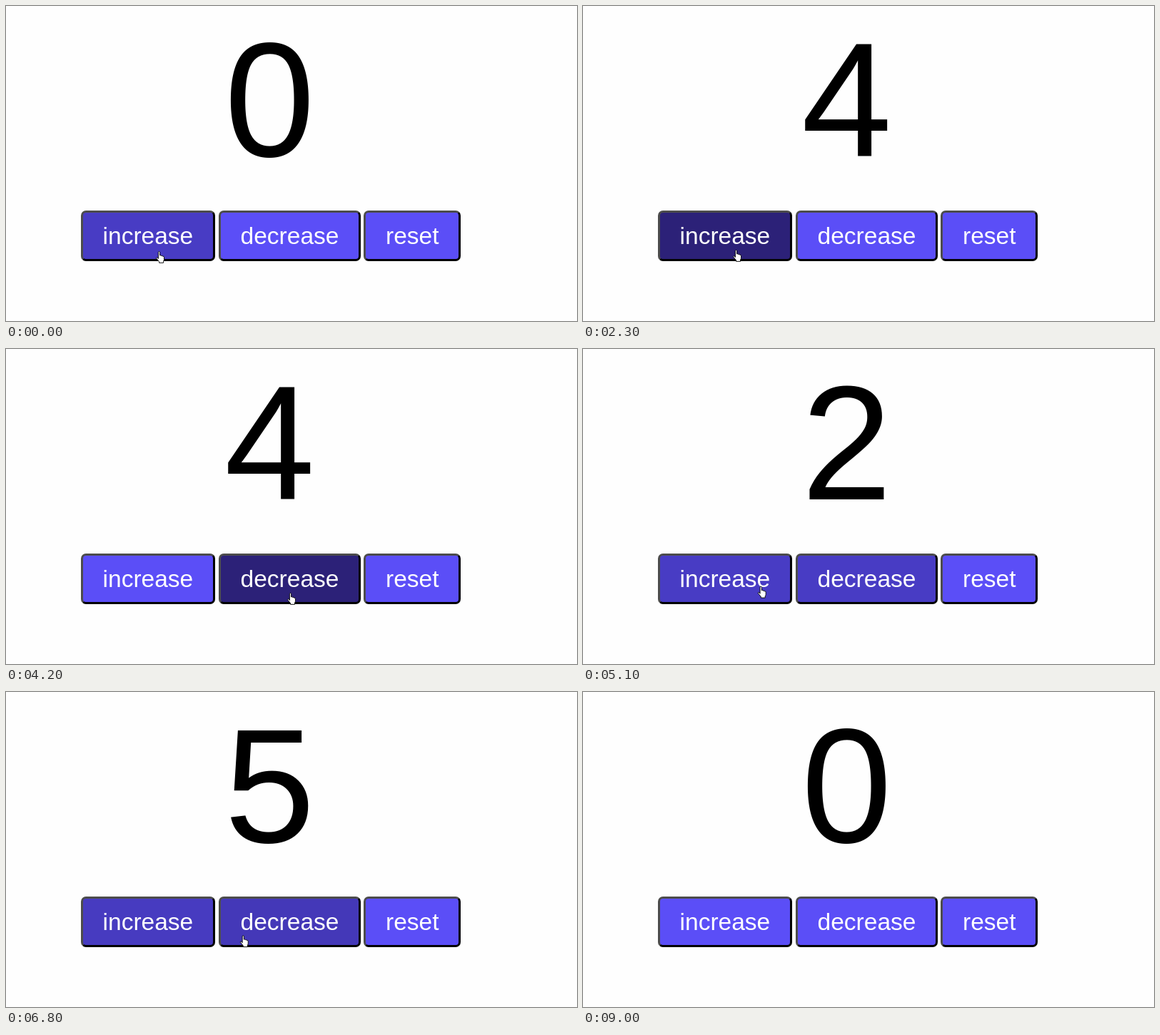
An HTML page for the animation above (9.1 s loop, 800 by 442 pixels).

```html
<!DOCTYPE html>
<html lang="en">
<head>
<meta charset="utf-8">
<title>Counter</title>
<style>
  html, body { margin: 0; width: 100%; height: 100%; overflow: hidden; background: #fefefe; }
  body { position: relative; font-family: "Liberation Sans", Arial, sans-serif; }
  svg { position: absolute; left: 0; top: 0; }
  .btn {
    position: absolute; top: 287px; height: 71px; box-sizing: border-box;
    border: 3px solid; border-color: #4c4c4c #000 #000 #4c4c4c; border-radius: 7px;
    padding: 0 27.6px; font-size: 33.5px; line-height: 65px; color: #fff; white-space: nowrap;
  }
  #increase { left: 105px; }
  #decrease { left: 298px; }
  #reset { left: 501.4px; }
  #count { font-size: 228px; text-anchor: middle; }
</style>
</head>
<body>
<svg width="800" height="442">
  <text id="count" x="369.5" y="211">0</text>
  <path id="one" d="M391.5 51H379C372 66 352 83 333.5 91V110C348 104 363 95 372 87V211H391.5Z"/>
</svg>
<div class="btn" id="increase">increase</div>
<div class="btn" id="decrease">decrease</div>
<div class="btn" id="reset">reset</div>
<svg width="800" height="442">
  <path id="hand" fill="#fff" stroke="#000" stroke-width=".9" stroke-linejoin="round"
    d="M3.4 10.5V1.8Q3.4.5 4.5.5T5.6 1.8V6Q7.3 5 7.7 6.6Q9.3 5.7 9.7 7.3Q11.5 6.7 11.5 8.6V11.5Q11.5 13 10.5 14.2V16.4H4.6V14.8L.9 10.3Q.2 9.2 1.2 8.7Q2.2 8.5 3.4 10.5Z"/>
</svg>
<script>
const LOOP = 9100, STEP = 100, FADE = 250, GONE = 8700;
const BASE = [91, 78, 247], HOVER = [44, 33, 120];
const $ = id => document.getElementById(id);
const clamp = u => Math.min(1, Math.max(0, u));

const actions = { increase: n => n + 1, decrease: n => n - 1, reset: () => 0 };

// each stay over a button, with a regular run of clicks
const visits = [
  { id: "increase", enter: -57, leave: 3408, first: 900, every: 350, clicks: 4 },
  { id: "decrease", enter: 3418, leave: 5008, first: 4300, every: 400, clicks: 2 },
  { id: "increase", enter: 5043, leave: 6714, first: 5500, every: 400, clicks: 3 },
  { id: "decrease", enter: 6727, leave: 7330, first: 7100, every: 400, clicks: 1 },
  { id: "reset", enter: 7859, leave: 8480, first: 8300, every: 400, clicks: 1 }
];

// eased pointer moves from one resting place to the next
const home = { x: 210, y: 344 };
const moves = [
  { from: 600, to: 1000, x: 210, y: 342 },
  { from: 3200, to: 3650, x: 394, y: 342 },
  { from: 4800, to: 5200, x: 217, y: 331 },
  { from: 6550, to: 6950, x: 379, y: 346 },
  { from: 7300, to: 7600, x: 450, y: 408 },
  { from: 7600, to: 7930, x: 570, y: 343.5 },
  { from: 8400, to: 8600, x: 570, y: 375 }
];

function countAt(t) {
  let n = 0;
  for (const v of visits)
    for (let i = 0; i < v.clicks; i++)
      if (t >= v.first + i * v.every) n = actions[v.id](n);
  return n;
}

function pointerAt(t) {
  let { x, y } = home;
  for (const m of moves) {
    const u = clamp((t - m.from) / (m.to - m.from)), e = u * u * (3 - 2 * u);
    x += (m.x - x) * e;
    y += (m.y - y) * e;
  }
  return [x, y];
}

const fade = ms => 1 - (1 - clamp(ms / FADE)) ** 2;

function colorAt(id, t) {
  const level = visits.filter(v => v.id === id)
    .reduce((sum, v) => sum + fade(t - v.enter) - fade(t - v.leave), 0);
  return `rgb(${BASE.map((c, i) => Math.round(c + (HOVER[i] - c) * level))})`;
}

function draw(now) {
  const t = Math.floor(now % LOOP / STEP) * STEP;
  const n = countAt(t);
  $("count").textContent = n;
  $("count").style.visibility = n === 1 ? "hidden" : "visible";
  $("one").style.visibility = n === 1 ? "visible" : "hidden";

  for (const id of ["increase", "decrease"]) $(id).style.background = colorAt(id, t);
  // the lower part of this button repaints slightly later
  $("reset").style.background =
    `linear-gradient(${colorAt("reset", t)} 43px, ${colorAt("reset", t - 24)} 43px)`;

  $("hand").setAttribute("transform", `translate(${pointerAt(t)})`);
  $("hand").style.visibility = t < GONE ? "visible" : "hidden";
}

const start = performance.now();
function tick() {
  draw(performance.now() - start);
  requestAnimationFrame(tick);
}
tick();
</script>
</body>
</html>
```
